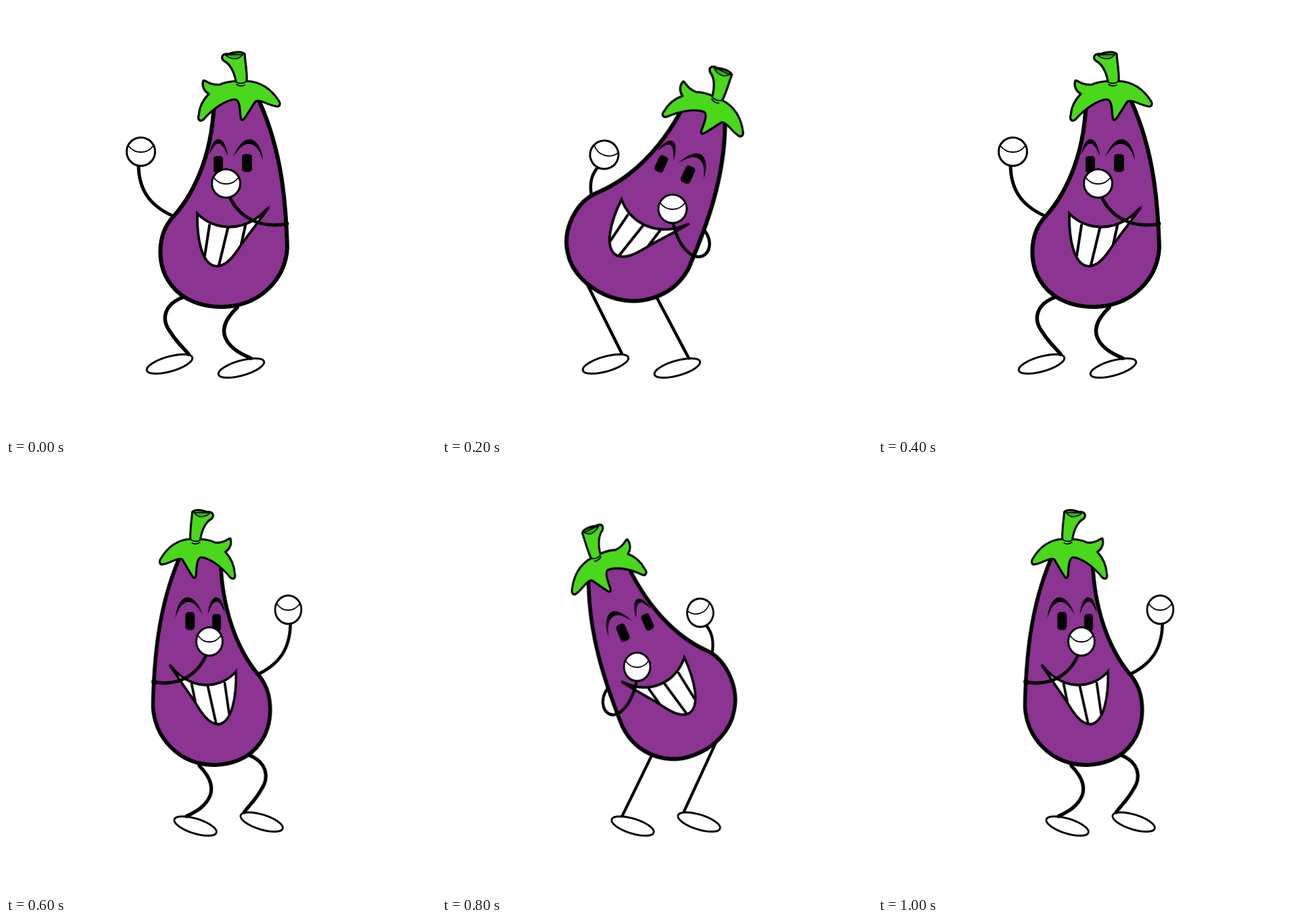
An HTML page without scripts for the animation above (1.2 s loop, 636 px wide and 636 px high).

```html
<!DOCTYPE html>
<html lang="en">
<head>
<meta charset="utf-8">
<title>Dancing eggplant</title>
<style>
html, body { margin: 0; width: 100%; height: 100%; overflow: hidden; background: #fff; }
svg { display: block; width: 100%; height: 100%; }
.line { fill: none; stroke: #000; stroke-linecap: round; }
.white { fill: #fff; stroke: #000; stroke-width: 3; }
.up, .lean, .body { animation: .6s step-end infinite; }
.up { animation-name: show-up; }
.lean { animation-name: show-lean; }
.body { animation-name: tilt; }
.dancer { animation: turn 1.2s step-end infinite; }
@keyframes show-up {
  0%, 66.666% { visibility: visible; }
  33.333% { visibility: hidden; }
}
@keyframes show-lean {
  0%, 66.666% { visibility: hidden; }
  33.333% { visibility: visible; }
}
@keyframes tilt {
  0%, 66.666% { transform: none; }
  33.333% { transform: matrix(.9063, .4226, -.4226, .9063, 138.8, -111.7); }
}
@keyframes turn {
  0% { transform: none; }
  50%, 83.333% { transform: matrix(-.925, 0, 0, 1, 602, 0); }
  66.666% { transform: matrix(-.925, 0, 0, 1, 604, 0); }
}
</style>
</head>
<body>
<svg viewBox="0 0 636 636">
  <defs>
    <ellipse id="foot" class="white" rx="35" ry="11" transform="rotate(-16)"/>
    <g id="hand">
      <circle class="white" r="21"/>
      <path class="line" stroke-width="1.800" d="M-18.500-9C-9 4 9 4 18.500-9"/>
    </g>
  </defs>
  <g class="dancer">
    <use href="#foot" x="242" y="529.500"/>
    <use href="#foot" x="348" y="535.500"/>

    <!-- limbs behind the body -->
    <g class="up">
      <path class="line" stroke-width="5.500" d="M264 430C235 440 228 462 243 482C252 497 262 505 270 515M342 446C325 462 316 480 328 497C337 510 350 515 362 521"/>
      <path class="line" stroke-width="5" d="M196 237C197 275 215 297 250 312"/>
      <use href="#hand" x="199.500" y="215.500"/>
    </g>
    <g class="lean">
      <path class="line" stroke-width="4.500" d="M214 410L266 514M317 430L365 521"/>
      <path class="line" stroke-width="4.500" d="M230 239C221 250 218 262 221 280"/>
      <use href="#hand" transform="translate(240 220) rotate(18)"/>
    </g>

    <g class="body">
      <path fill="#8b3491" stroke="#000" stroke-width="6" stroke-linejoin="round" d="M308 128C308 215 280 275 248 311C222 338 223 385 244 412C262 437 295 446 322 445C375 443 413 405 416 358C414 290 408 215 375 142L366 128Z"/>

      <!-- leafy cap and stem -->
      <path fill="#4ad81c" stroke="#000" stroke-width="3.200" stroke-linejoin="round" d="M340 111C337 96 332 86 322 81C317 76 320 70 329 71C338 68 348 67 353 71C354 85 357 100 356 111C378 112 394 125 404 141C407 147 403 150 398 148C388 147 378 138 369 141C364 148 358 159 352 167C349 170 347 168 347 164C346 150 345 139 339 138C325 139 307 151 292 168C287 172 283 168 285 162C286 148 291 139 300 130C293 126 289 118 292 110C297 110 301 118 317 116C325 112 332 112 340 111Z"/>
      <path fill="#36a814" stroke="#000" stroke-width="1.600" d="M325 73Q337 71 350 72Q344 79 338 78Q331 78 325 73Z"/>
      <path class="line" stroke-width="1.800" d="M339 112Q347 117 355 112M341 116Q347 120 353 117"/>

      <path d="M301 220C303 204 309 197 315 197C322 198 327 209 328 222C323 210 319 203.500 314 203.500C309 203.500 305 211 301 220ZM336 223C344 205 352 197 361 197C371 198 379 212 380 228C375 212 368 204 359 204C350 204 344 212 336 223Z"/>
      <rect x="307" y="222" width="14" height="25" rx="4.500"/>
      <rect x="349" y="219" width="15" height="26.500" rx="5"/>

      <path fill="#fff" stroke="#000" stroke-width="3.800" d="M283 307C308 333 355 337 389 297C372 322 356 341 348 353C337 370 326 385 311 385C290 383 282 345 283 307Z"/>
      <path class="line" stroke-width="4" d="M301 324L294 369M328 329L315 383M354 325L348 352"/>
    </g>

    <!-- front arm -->
    <g class="up">
      <path class="line" stroke-width="5" d="M331 283C345 312 375 330 416 322"/>
      <use href="#hand" x="325.500" y="262.500"/>
    </g>
    <g class="lean">
      <path class="line" stroke-width="4.500" d="M342 322C347 345 360 368 378 371C396 372 402 348 388 332"/>
      <use href="#hand" x="341" y="300"/>
    </g>
  </g>
</svg>
</body>
</html>
```
